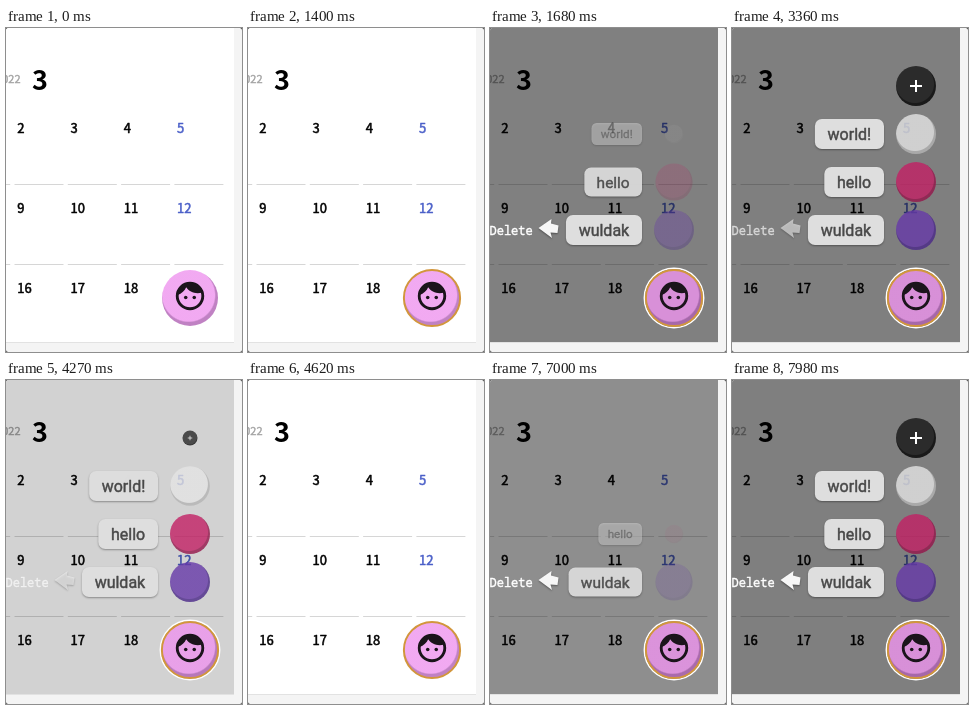
Recreate the animation shown at these times as an HTML page with a canvas. Size 236 by 324 pixels, loop 8 s.

```html
<!DOCTYPE html>
<html lang="en">
<head>
<meta charset="utf-8">
<title>Calendar speed dial</title>
<style>
html, body { margin: 0; width: 100%; height: 100%; overflow: hidden; background: #444; }
canvas { display: block; width: 236px; height: 324px; }
</style>
</head>
<body>
<canvas id="stage"></canvas>
<script>
const W = 236, H = 324, LOOP = 8000;
const canvas = document.getElementById('stage');
const ctx = canvas.getContext('2d');
const dpr = window.devicePixelRatio || 1;
canvas.width = W * dpr;
canvas.height = H * dpr;

const SANS = '"Noto Sans CJK KR", "Noto Sans CJK JP", "Noto Sans CJK", "Noto Sans", sans-serif';
const ROBOTO = 'Roboto, Arial, sans-serif';
const STEP = 70;        // stagger between actions
const SCALE_MS = 200, FADE_MS = 800;
const FAB_ALPHA = 0.8;

// Actions from bottom to top
const actions = [
  { y: 202, label: 'wuldak', top: '#6639a8', side: '#4a2888' },
  { y: 154, label: 'hello', top: '#c22064', side: '#94154a' },
  { y: 106, label: 'world!', top: '#e4e4e4', side: '#b4b4b4' },
  { y: 58, plus: true, top: '#161616', side: '#000' }
];

const clamp = v => Math.max(0, Math.min(1, v));

function bezier(x1, y1, x2, y2) {
  const at = (a, b, s) => 3 * a * s * (1 - s) ** 2 + 3 * b * s * s * (1 - s) + s ** 3;
  return x => {
    if (x <= 0) return 0;
    if (x >= 1) return 1;
    let lo = 0, hi = 1;
    for (let i = 0; i < 22; i++) {
      const mid = (lo + hi) / 2;
      if (at(x1, x2, mid) < x) lo = mid; else hi = mid;
    }
    return at(y1, y2, lo);
  };
}
const standard = bezier(0.4, 0, 0.2, 1);
const ease = bezier(0.25, 0.1, 0.25, 1);

// Dial phases: opens, closes, opens again
const OPEN_1 = 1474, CLOSE = 4190, OPEN_2 = 6864;

function progress(t, curve, inMs, outMs, inDelay = 0, outDelay = 0) {
  if (t >= OPEN_2) return curve((t - OPEN_2 - inDelay) / inMs);
  if (t >= CLOSE) return 1 - curve((t - CLOSE - outDelay) / outMs);
  return curve((t - OPEN_1 - inDelay) / inMs);
}

// A thin stroke gives a medium weight between regular and bold
function text(str, x, y, font, color, align = 'left', stroke = 0) {
  ctx.font = font;
  ctx.fillStyle = ctx.strokeStyle = color;
  ctx.textAlign = align;
  ctx.fillText(str, x, y);
  if (!stroke) return;
  ctx.lineWidth = stroke;
  ctx.lineJoin = 'round';
  ctx.strokeText(str, x, y);
}

function drawCalendar() {
  ctx.fillStyle = '#f4f4f4';
  ctx.fillRect(0, 0, W, H);
  ctx.fillStyle = '#fff';
  ctx.fillRect(0, 0, 228, 314);
  ctx.fillStyle = '#e2e2e2';
  ctx.fillRect(0, 314, 228, 1);

  text('2022', 14.5, 55, '400 11px ' + SANS, '#a4a4a4', 'right', 0.4);
  text('3', 26, 61.5, '700 27px ' + SANS, '#000');
  for (let row = 0; row < 3; row++) {
    for (let col = 0; col < 4; col++) {
      if (row === 2 && col === 3) continue;
      const color = col === 3 ? '#4a5fc8' : '#000';
      text(String(2 + row * 7 + col), 11.2 + col * 53.3, 105 + row * 80, '400 13px ' + SANS, color, 'left', 0.5);
    }
  }
  ctx.fillStyle = '#d6d6d6';
  for (let row = 0; row < 2; row++) {
    for (let col = -1; col < 4; col++) {
      ctx.fillRect(8.5 + col * 53.3, 156 + row * 80, 49, 1);
    }
  }
}

function disc(x, y, r, top, side) {
  const cx = x - r * 0.05, cy = y - r * 0.1, R = r * 1.25;
  const g = ctx.createRadialGradient(cx, cy, 0, cx, cy, R);
  const edge = r * 0.95 / R;
  g.addColorStop(0, top);
  g.addColorStop(edge - 0.02, top);
  g.addColorStop(edge + 0.02, side);
  g.addColorStop(1, side);
  ctx.fillStyle = g;
  ctx.beginPath();
  ctx.arc(x, y, r, 0, 7);
  ctx.fill();
}

function ring(x, y, r, width, color) {
  ctx.strokeStyle = color;
  ctx.lineWidth = width;
  ctx.beginPath();
  ctx.arc(x, y, r, 0, 7);
  ctx.stroke();
}

function drawFace(x, y, scale) {
  ctx.save();
  ctx.translate(x, y);
  ctx.scale(scale, scale);
  ctx.translate(-12, -12);
  ring(12, 12, 9, 2, '#1b141b');
  ctx.fillStyle = '#1b141b';
  ctx.beginPath();
  ctx.moveTo(3, 11.5);
  ctx.bezierCurveTo(6.4, 10.1, 8.3, 8.2, 9.3, 5.8);
  ctx.bezierCurveTo(11, 8.3, 14, 10, 17.4, 10);
  ctx.quadraticCurveTo(19, 10, 20.6, 9.6);
  ctx.arc(12, 12, 9.5, -0.27, -Math.PI + 0.06, true);
  ctx.fill();
  for (const ex of [9, 15]) {
    ctx.beginPath();
    ctx.arc(ex, 13, 1.25, 0, 7);
    ctx.fill();
  }
  ctx.restore();
}

function drawMainFab(focused) {
  ctx.globalAlpha = FAB_ALPHA;
  disc(184, 270, 28, '#ee94ee', '#b062b4');
  ctx.globalAlpha = 1;
  if (focused) {
    ring(184, 270, 29.7, 1.5, '#fff');
    ring(184, 270, 28.1, 2, '#d2963c');
  }
  drawFace(184, 268, 1.42);
}

function drawHint(alpha) {
  ctx.save();
  ctx.globalAlpha = alpha;
  text('Delete', -0.5, 206.5, '500 12px "Noto Sans Mono", "DejaVu Sans Mono", monospace', '#fff', 'left', 0.4);
  ctx.shadowColor = 'rgba(0,0,0,.4)';
  ctx.shadowBlur = 2 * dpr;
  ctx.shadowOffsetY = dpr;
  ctx.fillStyle = '#f6f6f6';
  ctx.beginPath();
  [[48.5, 200], [61.5, 191], [61, 195.5], [68.5, 197.5], [67.5, 205], [60.5, 204.5], [62, 210]]
    .forEach(([x, y]) => ctx.lineTo(x, y));
  ctx.closePath();
  ctx.fill();
  ctx.restore();
}

function drawLabel(str, y, p) {
  if (p <= 0) return;
  ctx.save();
  ctx.globalAlpha = p;
  ctx.translate(152, y);
  ctx.scale(0.5 + p / 2, 0.5 + p / 2);
  const font = '400 16px ' + ROBOTO;
  ctx.font = font;
  const w = ctx.measureText(str).width + 25.5;
  ctx.shadowColor = 'rgba(0,0,0,.35)';
  ctx.shadowBlur = 2 * dpr;
  ctx.shadowOffsetY = dpr;
  ctx.fillStyle = '#dedede';
  ctx.beginPath();
  ctx.roundRect(-w, -15, w, 30, 7);
  ctx.fill();
  ctx.shadowColor = 'transparent';
  text(str, -w + 12.7, 6, font, '#484848', 'left', 0.45);
  ctx.restore();
}

function drawAction(a, i, t, pressed) {
  const inDelay = i * STEP, outDelay = (actions.length - 1 - i) * STEP;
  const size = progress(t, standard, SCALE_MS, SCALE_MS, inDelay, outDelay);
  const alpha = progress(t, ease, FADE_MS, FADE_MS, inDelay, outDelay);
  if (size > 0) {
    ctx.save();
    ctx.translate(184, a.y);
    ctx.scale(size, size);
    ctx.globalAlpha = alpha * FAB_ALPHA;
    disc(0, 0, 20, pressed ? '#b01c5a' : a.top, a.side);
    if (a.plus) {
      ctx.globalAlpha = alpha;
      ctx.fillStyle = '#fff';
      ctx.fillRect(-6, -1, 12, 2);
      ctx.fillRect(-1, -6, 2, 12);
    }
    ctx.restore();
  }
  if (a.label) drawLabel(a.label, a.y, size);
}

function draw(t) {
  ctx.setTransform(dpr, 0, 0, dpr, 0, 0);
  ctx.fillStyle = '#444';
  ctx.fillRect(0, 0, W, H);
  ctx.save();
  ctx.beginPath();
  ctx.roundRect(0, 0, W, H, 2.5);
  ctx.clip();
  drawCalendar();

  const dim = progress(t, standard, 225, 195);
  ctx.fillStyle = `rgba(0,0,0,${dim * 0.5})`;
  ctx.fillRect(0, 0, 228, 314);
  if (dim > 0) {
    const settle = t < OPEN_2 ? 1 - 0.4 * clamp((t - 2660) / 420) : 1;
    drawHint(settle * clamp(dim * 3));
  }

  const away = t >= 3500 && t < 3850;
  actions.forEach((a, i) => drawAction(a, i, t, away && i === 1));
  drawMainFab(t >= 630 && !away);
  ctx.restore();
}

const start = performance.now();
function tick() {
  draw((performance.now() - start) % LOOP);
  requestAnimationFrame(tick);
}
tick();
</script>
</body>
</html>
```
